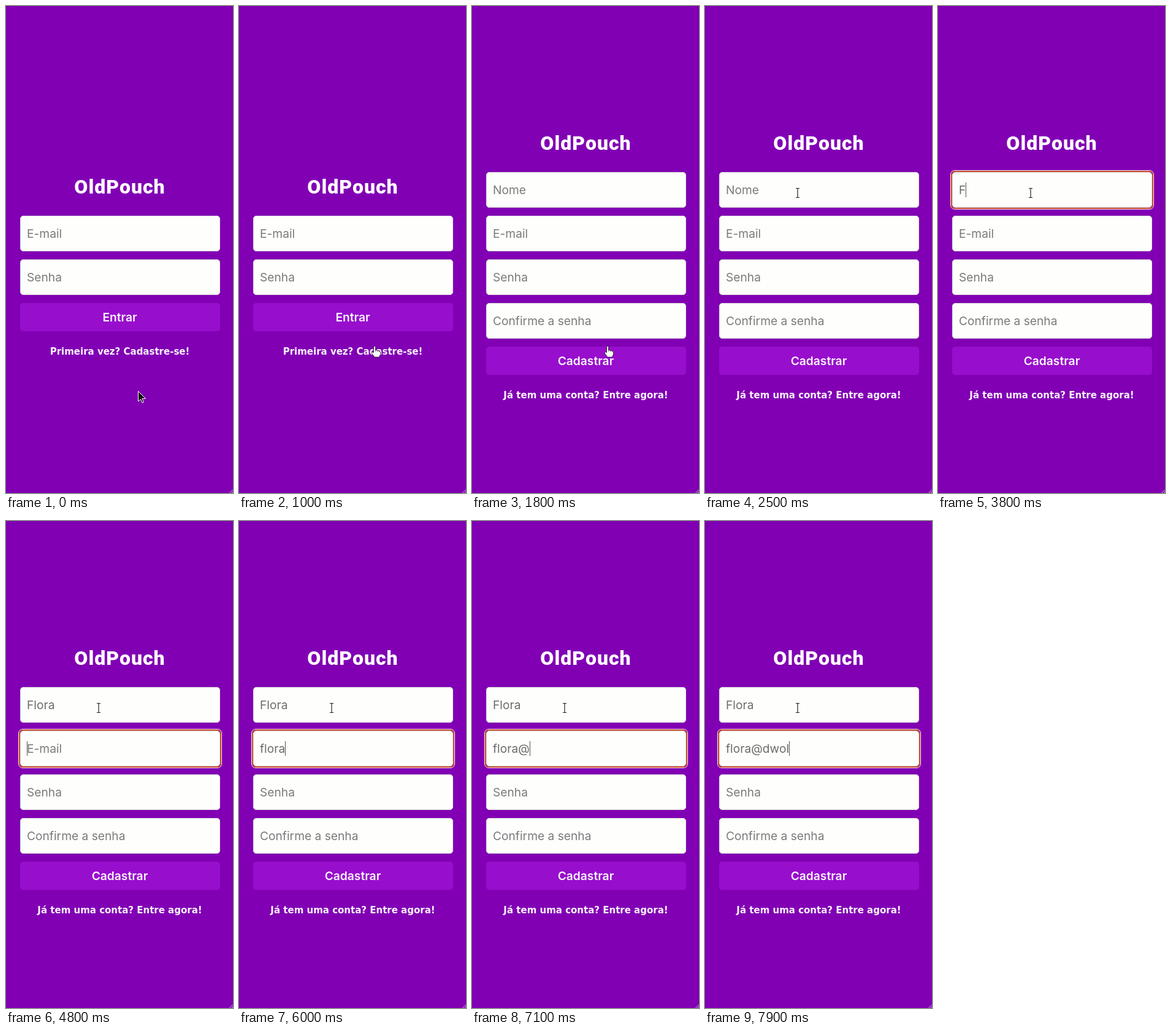
An HTML page that plays this animation: 370x792 px, repeating every 8 s.

```html
<!DOCTYPE html>
<html lang="pt-BR">
<head>
<meta charset="utf-8">
<title>OldPouch</title>
<style>
  html, body { margin: 0; width: 100%; height: 100%; overflow: hidden; background: #8100b4; }
  svg { display: block; width: 370px; height: 792px; }
  .title { font: 900 32px Roboto, sans-serif; letter-spacing: 1px; fill: #fff; text-anchor: middle; }
  .field { fill: #fefffc; stroke: #d5d5d5; }
  .hint, .typed { font: 400 19.2px Inter, sans-serif; fill: #7a7a7a; }
  .typed { fill: #6c6c6c; }
  .button { fill: #970ecc; }
  .label { font: 600 19.2px Inter, sans-serif; fill: #fcf5ff; text-anchor: middle; }
  .link { font: 700 15px "DejaVu Sans", sans-serif; fill: #fcf5ff; text-anchor: middle; }
</style>
</head>
<body>
<svg id="stage" viewBox="0 0 370 792">
  <rect width="370" height="792" fill="#8100b4"/>
  <g id="login"></g>
  <g id="signup"></g>
  <g id="focus" fill="none">
    <rect x="20.5" y="-2.5" width="331" height="63" rx="6.5" stroke="#f7e6ee"/>
    <rect x="22" y="-1" width="328" height="60" rx="5.5" stroke="#c8472c" stroke-width="2"/>
  </g>
  <rect id="caret" width="1" height="24" fill="#555"/>
  <path d="M364.5 792L370 786.5M368 792L370 790" stroke="#cfc3d6"/>
  <g id="arrow">
    <path d="M0 0V16.5L4 13L6.5 18.8L9 17.7L6.5 12H12Z" fill="#111" stroke="#fff" stroke-linejoin="round"/>
  </g>
  <g id="hand">
    <path d="M5 11V2a1.5 1.5 0 0 1 3 0V7.5q3-.8 3 .6q2.6-.6 2.8 .8q2-.3 2.2 1V14L14 18.5H6.5L2 12.5Q1 10.5 3 10.2Z"
      fill="#fff" stroke="#111" stroke-width=".8" stroke-linejoin="round"/>
    <path d="M8 8v2M11 8.5v1.7M13.8 9.3v1.5" stroke="#111" stroke-width=".5"/>
  </g>
  <g id="beam" fill="none">
    <path d="M-3 -7.5H3M-3 7.5H3M0 -7.5V7.5" stroke="#fff" stroke-width="3"/>
    <path d="M-3 -7.5H3M-3 7.5H3M0 -7.5V7.5" stroke="#222" stroke-width="1.2"/>
  </g>
</svg>
<script>
const LOOP = 8000, MID = 185.5, LEFT = 34, ROW = 71, FORM_TOP = 270;
const $ = id => document.getElementById(id);

function add(parent, tag, attrs, text = '') {
  const el = document.createElementNS('http://www.w3.org/2000/svg', tag);
  for (const key in attrs) el.setAttribute(key, attrs[key]);
  el.textContent = text;
  parent.append(el);
  return el;
}

function buildForm(id, top, hints, label, link) {
  const form = $(id), end = top + ROW * hints.length;
  add(form, 'text', { class: 'title', x: MID, y: top - 36 }, 'OldPouch');
  const fields = hints.map((hint, i) => {
    const y = top + ROW * i;
    add(form, 'rect', { class: 'field', x: 23.5, y: y + .5, width: 325, height: 57, rx: 4.5 });
    return {
      hint: add(form, 'text', { class: 'hint', x: LEFT, y: y + 36 }, hint),
      typed: add(form, 'text', { class: 'typed', x: LEFT, y: y + 36 })
    };
  });
  add(form, 'rect', { class: 'button', x: 23, y: end, width: 326, height: 46, rx: 5 });
  add(form, 'text', { class: 'label', x: MID, y: end + 30 }, label);
  add(form, 'text', { class: 'link', x: MID, y: end + 84 }, link);
  return fields;
}

buildForm('login', FORM_TOP + ROW, ['E-mail', 'Senha'], 'Entrar', 'Primeira vez? Cadastre-se!');
const fields = buildForm('signup', FORM_TOP, ['Nome', 'E-mail', 'Senha', 'Confirme a senha'],
  'Cadastrar', 'Já tem uma conta? Entre agora!');

// Each step: start time, then its values
const pages = [[0, 'login'], [1800, 'signup']];
const focusSteps = [[0, -1], [2600, 0], [4800, 1]];
const pointer = [
  [0, 'arrow', 215.5, 626.5], [400, 'arrow', 215.5, 611.8],
  [600, 'hand', 214.5, 558.5], [800, 'hand', 214.5, 554.5], [1000, 'hand', 214.5, 552.5],
  [2100, 'hand', 214, 564], [2200, 'beam', 212, 520], [2300, 'beam', 190, 436],
  [2400, 'beam', 166, 358], [2500, 'beam', 151, 304]
];
// Each step: start time, number of letters
const typing = [
  { text: 'Flora', steps: [[0, 0], [3800, 1], [4100, 2], [4300, 4], [4400, 5]] },
  { text: 'flora@dwol', steps: [[0, 0], [5400, 1], [5600, 2], [5700, 3], [5800, 4], [6000, 5],
    [7000, 6], [7400, 7], [7600, 8], [7800, 9], [7900, 10]] }
];

const at = (steps, t) => steps.findLast(step => step[0] <= t).slice(1);
const show = (el, on) => el.setAttribute('visibility', on ? 'visible' : 'hidden');
const move = (el, x, y) => el.setAttribute('transform', `translate(${x} ${y})`);

function draw(t) {
  const [page] = at(pages, t);
  for (const id of ['login', 'signup']) $(id).style.display = id === page ? '' : 'none';

  typing.forEach(({ text, steps }, i) => {
    const [count] = at(steps, t);
    fields[i].typed.textContent = text.slice(0, count);
    fields[i].hint.style.display = count ? 'none' : '';
  });

  const [active] = at(focusSteps, t);
  show($('focus'), active >= 0);
  show($('caret'), active >= 0);
  if (active >= 0) {
    const y = FORM_TOP + ROW * active, { typed } = fields[active];
    const width = typed.textContent ? typed.getComputedTextLength() : 0;
    move($('focus'), 0, y);
    move($('caret'), Math.round(LEFT + width), y + 17);
  }

  const [kind, x, y] = at(pointer, t);
  for (const id of ['arrow', 'hand', 'beam']) show($(id), id === kind);
  move($(kind), x, y);
}

const start = performance.now();
function tick() {
  draw((performance.now() - start) % LOOP);
  requestAnimationFrame(tick);
}
tick();
</script>
</body>
</html>
```
